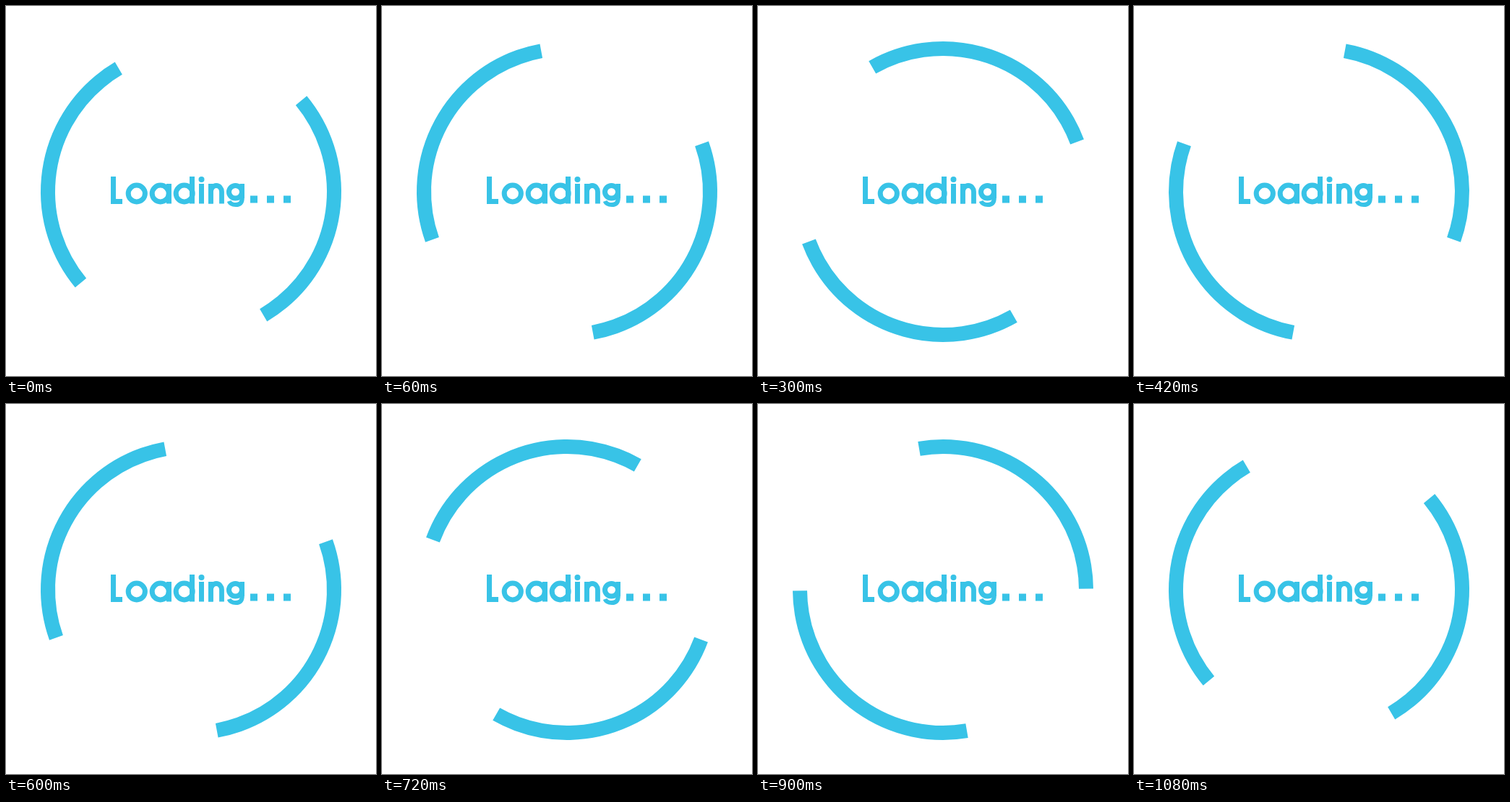
An HTML page with a canvas for the animation above (1.11 s loop, 512 by 512 pixels).

```html
<!DOCTYPE html>
<html lang="en">
<head>
<meta charset="utf-8">
<title>Loading</title>
<style>
  html, body { margin: 0; width: 100%; height: 100%; overflow: hidden; background: #fff; }
  canvas { display: block; width: 512px; height: 512px; }
</style>
</head>
<body>
<canvas id="stage" width="512" height="512" role="img" aria-label="Loading...">Loading...</canvas>
<script>
const ctx = document.getElementById('stage').getContext('2d');
const COLOR = '#38c3e7';
const LOOP = 1110, STEP = 30, TURN = 10;
const CX = 256, CY = 257, RADIUS = 198;
const rad = deg => deg * Math.PI / 180;

function stroke(width, build) {
  ctx.lineWidth = width;
  ctx.beginPath();
  build();
  ctx.stroke();
}

function ring(x, y, rx, ry) {
  stroke(7, () => ctx.ellipse(x, y, rx, ry, 0, 0, 2 * Math.PI));
}

// Geometric lettering built from stems, rings and arcs
function drawWord() {
  ctx.fillRect(145, 236, 7, 38);          // L
  ctx.fillRect(145, 267, 16, 7);

  ring(180.8, 259.5, 11.6, 11.4);         // o

  ring(213.7, 259.5, 11.5, 11.4);         // a
  ctx.fillRect(222, 246, 7, 27.5);

  ring(246.7, 259.5, 11.5, 11.4);         // d
  ctx.fillRect(254, 236, 7, 37.5);

  ctx.fillRect(267, 246, 7, 27.5);        // i
  ctx.beginPath();
  ctx.arc(270.5, 240, 4, 0, 2 * Math.PI);
  ctx.fill();

  ctx.fillRect(280, 246, 6.5, 27.5);      // n
  stroke(6.8, () => {
    ctx.moveTo(283.5, 273.5);
    ctx.lineTo(283.5, 257);
    ctx.ellipse(291, 257, 7.5, 8.5, 0, Math.PI, 2 * Math.PI);
    ctx.lineTo(298.5, 273.5);
  });

  ring(317.5, 257.3, 9, 8.8);             // g
  ctx.fillRect(323.5, 246, 6.5, 20);
  stroke(6, () => {
    ctx.moveTo(326.8, 265);
    ctx.bezierCurveTo(327, 272, 324, 275, 318, 275);
    ctx.bezierCurveTo(313, 275, 310, 273.5, 308.6, 270);
  });

  for (let i = 0; i < 3; i++) ctx.fillRect(338 + 23 * i, 262.5, 10, 10);
}

function draw(time) {
  const turn = Math.floor((time % LOOP + 0.01) / STEP) * TURN;
  ctx.clearRect(0, 0, 512, 512);
  ctx.fillStyle = ctx.strokeStyle = COLOR;
  for (const base of [140, 320]) {
    const start = base + turn;
    stroke(20, () => ctx.arc(CX, CY, RADIUS, rad(start + 0.4), rad(start + 99.6)));
  }
  drawWord();
}

const begin = performance.now();
function frame() {
  draw(performance.now() - begin);
  requestAnimationFrame(frame);
}
frame();
</script>
</body>
</html>
```
